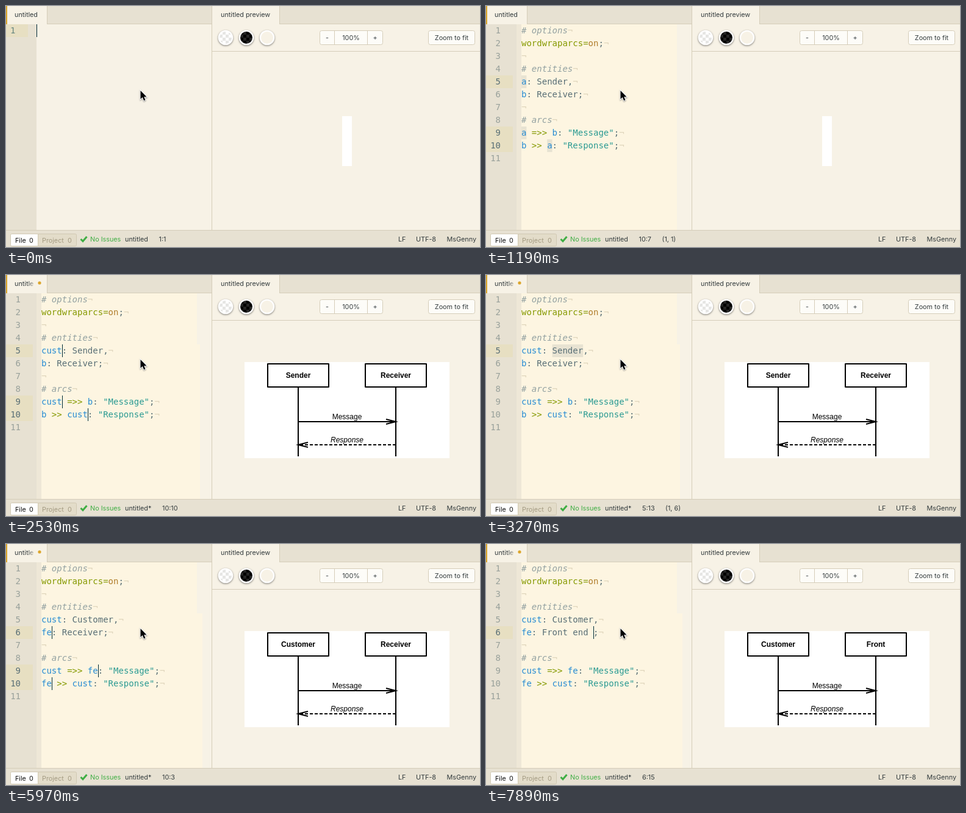
Animation, 777 px wide and 396 px high, one loop 8000 ms. Source, as an HTML page with a canvas:

```html
<!DOCTYPE html>
<html lang="en">
<head>
<meta charset="utf-8">
<title>Sequence chart editor</title>
<style>
html, body { margin: 0; width: 777px; height: 396px; overflow: hidden; }
canvas { display: block; }
</style>
</head>
<body>
<canvas id="stage" width="777" height="396"></canvas>
<script>
const ctx = document.getElementById('stage').getContext('2d');
const LOOP = 8000, LEFT = 58, ROW = 21, CHAR = 8.43;
const UI = '10.8px Inter, sans-serif';
const MONO = '14px "DejaVu Sans Mono", monospace';
const CHART = '12px "Liberation Sans", Arial, sans-serif';
const C = {
  pane: '#f7f2e6', bar: '#e7e1d2', line: '#d5cdb9', page: '#fdf5e1',
  active: '#e7dfc2', select: '#e8e3d2', ink: '#333b3d', code: '#586e75',
  comment: '#93a1a1', key: '#859900', value: '#b07d2b', id: '#268bd2',
  string: '#2a9a92', mark: '#ded4bb', green: '#3fae44', gold: '#dca62c'
};

const rowTop = row => 30 + ROW * (row - 1);
const colX = col => LEFT + CHAR * col;

// Each entry changes part of the state from its time on.
const typeFirst = n => ({
  a: 'cust'.slice(0, n), sel: [], on: true, edge: 318,
  cursors: [[5, n], [9, n], [10, 5 + n]], pos: '10:' + (6 + n), span: ''
});
const typeName = (n, matched) => ({
  left: 'Customer'.slice(0, n), sel: [], on: true, edge: 322,
  cursors: [[5, 6 + n]], pos: '5:' + (7 + n), span: '',
  popup: matched && [5, 6, 'Customer', matched]
});
const typeSecond = n => ({
  right: 'Front end '.slice(0, n), sel: [], on: true,
  cursors: [[6, 4 + n]], pos: '6:' + (5 + n), span: ''
});
const timeline = [
  [0, { blank: true, typed: '', on: true, dirty: false, a: 'a', b: 'b',
        left: 'Sender', right: 'Receiver', chart: null, popup: null,
        cursors: [], sel: [], pos: '1:1', span: '', edge: 313 }],
  [450, { on: false }],
  [750, { on: true, typed: 'm', pos: '1:2' }],
  [890, { typed: 'ms', pos: '1:3' }],
  [1190, { blank: false, on: false, cursors: [[5, 1], [9, 1], [10, 6]],
           sel: [[5, 0, 1], [9, 0, 1], [10, 5, 1]], pos: '10:7', span: '(1, 1)' }],
  [1490, { dirty: true, chart: ['Sender', 'Receiver'] }],
  [2230, typeFirst(1)],
  [2380, typeFirst(2)],
  [2530, typeFirst(4)],
  [2830, { on: false, popup: [10, 5, 'Customer', 4] }],
  [2970, { popup: null }],
  [3270, { cursors: [[5, 12]], sel: [[5, 6, 6]], pos: '5:13', span: '(1, 6)' }],
  [4020, typeName(1)],
  [4170, typeName(2, 1)],
  [4320, typeName(4, 3)],
  [4470, typeName(6, 5)],
  [4620, typeName(7, 6)],
  [4770, typeName(8, 7)],
  [4920, { popup: null }],
  [5070, { chart: ['Customer', 'Receiver'] }],
  [5970, { b: 'fe', cursors: [[6, 2], [9, 11], [10, 2]], pos: '10:3' }],
  [6120, { on: false, cursors: [[6, 12]], sel: [[6, 4, 8]], pos: '6:13', span: '(1, 8)' }],
  [6570, typeSecond(1)],
  [6720, typeSecond(2)],
  [6870, typeSecond(4)],
  [7010, typeSecond(5)],
  [7310, { chart: ['Customer', 'Front'] }],
  [7460, typeSecond(6)],
  [7610, typeSecond(7)],
  [7760, typeSecond(9)],
  [7890, typeSecond(10)]
];
const stateAt = t =>
  Object.assign({}, ...timeline.filter(e => e[0] <= t).map(e => e[1]));

function rect(x, y, w, h, fill) {
  ctx.fillStyle = fill;
  ctx.fillRect(x, y, w, h);
}
function text(str, x, y, fill = C.ink, font = UI, align = 'left') {
  ctx.font = font;
  ctx.fillStyle = fill;
  ctx.textAlign = align;
  ctx.fillText(str, x, y);
}
function path(points, width, color = '#000', dash = []) {
  ctx.beginPath();
  points.forEach(p => ctx.lineTo(...p));
  ctx.setLineDash(dash);
  ctx.lineWidth = width;
  ctx.strokeStyle = color;
  ctx.stroke();
  ctx.setLineDash([]);
}
function rounded(x, y, w, h, r, fill, stroke) {
  ctx.beginPath();
  ctx.roundRect(x, y, w, h, r);
  ctx.fillStyle = fill;
  ctx.fill();
  if (!stroke) return;
  ctx.lineWidth = 1;
  ctx.strokeStyle = stroke;
  ctx.stroke();
}
function shadowed(blur, alpha, offset, draw) {
  ctx.save();
  ctx.shadowColor = `rgba(0,0,0,${alpha})`;
  ctx.shadowBlur = blur;
  ctx.shadowOffsetY = offset;
  draw();
  ctx.restore();
}
function disc(x, y, r, fill) {
  ctx.beginPath();
  ctx.arc(x, y, r, 0, Math.PI * 2);
  ctx.fillStyle = fill;
  ctx.fill();
}

function swatch(x, even, odd) {
  const y = 52;
  shadowed(3, 0.5, 1, () => disc(x, y, 12.3, '#fff'));
  ctx.save();
  ctx.beginPath();
  ctx.arc(x, y, 10, 0, Math.PI * 2);
  ctx.clip();
  for (let i = 0; i < 4; i++)
    for (let j = 0; j < 4; j++)
      rect(x - 10 + i * 5, y - 10 + j * 5, 5, 5, (i + j) % 2 ? odd : even);
  ctx.restore();
}

function drawTabs(s) {
  rect(0, 0, 777, 30, C.bar);
  rect(0, 29, 777, 1, C.line);
  rect(0, 0, 67, 30, C.pane);
  rect(0, 0, 2, 30, C.gold);
  rect(67, 0, 1, 30, C.line);
  rect(338, 0, 110, 30, C.pane);
  rect(448, 0, 1, 30, C.line);
  if (s.dirty) {
    const fade = ctx.createLinearGradient(36, 0, 47, 0);
    fade.addColorStop(0, C.ink);
    fade.addColorStop(1, 'rgba(51,59,61,0.15)');
    text('untitle', 14, 18, fade);
    disc(55, 13, 2.6, C.gold);
  } else {
    text('untitled', 14, 18);
  }
  text('untitled preview', 352, 18);
}

function drawToolbar() {
  rect(338, 74, 439, 1, C.line);
  swatch(360, '#fff', '#e6e6e4');
  swatch(394, '#000', '#242424');
  swatch(428, C.pane, C.pane);
  const face = '#fdfcf8';
  rounded(514.5, 40.5, 103, 23, 3, face, C.line);
  rect(538, 41, 1, 22, C.line);
  rect(592, 41, 1, 22, C.line);
  rounded(692.5, 40.5, 76, 23, 3, face, C.line);
  text('-', 526.5, 56, C.ink, UI, 'center');
  text('100%', 565.5, 56, C.ink, UI, 'center');
  text('+', 605, 56, C.ink, UI, 'center');
  text('Zoom to fit', 730.5, 56, C.ink, UI, 'center');
}

function arrow(from, to, y, label, style, dash) {
  const back = to - Math.sign(to - from) * 16;
  path([[from, y], [to, y]], 2, '#000', dash);
  path([[back, y - 4], [to, y], [back, y + 4]], 2);
  text(label, 559, y - 4, '#000', style + CHART, 'center');
}
function drawChart(names) {
  if (!names) return rect(551, 181, 16, 82, '#fff');
  rect(391, 143, 336, 158, '#fff');
  names.forEach((name, i) => {
    const x = 479 + 160 * i;
    ctx.lineWidth = 2;
    ctx.strokeStyle = '#000';
    ctx.lineJoin = 'round';
    ctx.strokeRect(x - 50, 146, 100, 38);
    ctx.lineJoin = 'miter';
    path([[x, 184], [x, 298]], 2);
    text(name, x, 169, '#000', 'bold ' + CHART, 'center');
  });
  arrow(479, 639, 241, 'Message', '', []);
  arrow(639, 479, 279, 'Response', 'italic ', [5, 3]);
}

function sourceLines(s) {
  const plain = str => [str, C.code];
  const id = str => [str, C.id];
  const note = str => [[str, C.comment, 'italic ']];
  const arc = (from, op, to, label) => [
    id(from), [` ${op} `, C.key], id(to), plain(': '),
    [`"${label}"`, C.string], plain(';')
  ];
  return [
    note('# options'),
    [['wordwraparcs=', C.key], ['on', C.value], plain(';')],
    [],
    note('# entities'),
    [id(s.a), plain(`: ${s.left},`)],
    [id(s.b), plain(`: ${s.right};`)],
    [],
    note('# arcs'),
    arc(s.a, '=>>', s.b, 'Message'),
    arc(s.b, '>>', s.a, 'Response')
  ];
}

function popup(x, y, w, word, matched, textX) {
  shadowed(8, 0.4, 2, () => rounded(x, y, w, 29, 3, '#e5dfd2'));
  const split = word.slice(0, matched);
  text(split, textX, y + 20, '#111', 'bold ' + MONO);
  text(word.slice(matched), textX + CHAR * matched, y + 20, '#4a4a48', MONO);
}

function drawBlankEditor(s) {
  rect(0, 30, 50, 338, C.bar);
  rect(0, 30, 36, ROW, C.active);
  text('1', 7, 45, '#66867f', MONO);
  text(s.typed, 50, 45, C.code, MONO);
  if (s.on) rect(50 + Math.round(CHAR * s.typed.length), 30, 1, ROW, '#002b36');
  if (s.typed) {
    popup(12, 51, 249, 'msc', s.typed.length, 50);
    rounded(12, 51, 29, 29, [3, 0, 0, 3], '#cbd6b4');
  }
}

function drawEditor(s) {
  if (s.blank) return drawBlankEditor(s);
  rect(0, 30, 50, 338, C.bar);
  rect(50, 30, 8, 338, '#eee7d7');
  rect(LEFT, 30, 313 - LEFT, 338, C.page);
  rect(313, 114, s.edge - 313, 254, C.page);

  const activeRows = s.cursors.map(c => c[0]);
  activeRows.forEach(row => rect(0, rowTop(row), 44, ROW, C.active));
  s.sel.forEach(([row, col, len]) =>
    rect(colX(col), rowTop(row), CHAR * len, ROW, C.select));
  for (let row = 1; row <= 11; row++)
    text(row, 24, rowTop(row) + 15,
      activeRows.includes(row) ? C.code : '#98a09a', MONO, 'right');

  sourceLines(s).forEach((runs, i) => {
    const y = rowTop(i + 1) + 15;
    let col = 0;
    for (const [str, color, style = ''] of [...runs, ['¬', C.mark]]) {
      text(str, colX(col), y, color, style + MONO);
      col += str.length;
    }
  });
  if (s.on) s.cursors.forEach(([row, col]) =>
    rect(Math.round(colX(col)), rowTop(row), 1, ROW, '#002b36'));
  if (s.popup) {
    const [row, col, word, matched] = s.popup;
    popup(Math.round(colX(col)) - 9, rowTop(row) + ROW - 1, 202, word, matched, colX(col));
  }
}

function drawStatus(s) {
  const y = 387;
  rect(0, 368, 777, 28, C.bar);
  rect(0, 368, 777, 1, C.line);
  rounded(52.5, 374.5, 63, 20, [0, 2, 2, 0], '#e3dcc9', '#d0c8b2');
  rounded(7.5, 374.5, 45, 20, [2, 0, 0, 2], '#fff', '#d0c8b2');
  text('File', 15, 389, '#111');
  text('0', 38, 389, '#111');
  text('Project', 59, 389, '#a49b82');
  text('0', 101, 389, '#a49b82');
  path([[122.5, 383], [126, 386.5], [132.5, 379]], 3, C.green);
  text('No Issues', 138, y, C.green);
  text(s.dirty ? 'untitled*' : 'untitled', 195, y);
  const x = s.dirty ? 256 : 250.5;
  text(s.pos, x, y);
  text(s.span, x + 38, y);
  text('LF', 643, y);
  text('UTF-8', 672, y);
  text('MsGenny', 771, y, C.ink, UI, 'right');
}

function drawPointer() {
  ctx.beginPath();
  [[0, 0], [0, 14], [3.2, 11], [5.6, 16.4], [8, 15.4], [5.7, 10.2], [10, 10.2]]
    .forEach(([x, y]) => ctx.lineTo(220.5 + x, 139 + y));
  ctx.closePath();
  ctx.lineWidth = 2;
  ctx.strokeStyle = '#fff';
  shadowed(2, 0.4, 1, () => ctx.stroke());
  ctx.fillStyle = '#000';
  ctx.fill();
}

function frame() {
  const s = stateAt(performance.now() % LOOP);
  rect(0, 0, 777, 396, C.pane);
  drawTabs(s);
  drawEditor(s);
  rect(337, 0, 1, 368, C.line);
  drawToolbar();
  drawChart(s.chart);
  drawStatus(s);
  drawPointer();
  requestAnimationFrame(frame);
}
frame();
</script>
</body>
</html>
```
